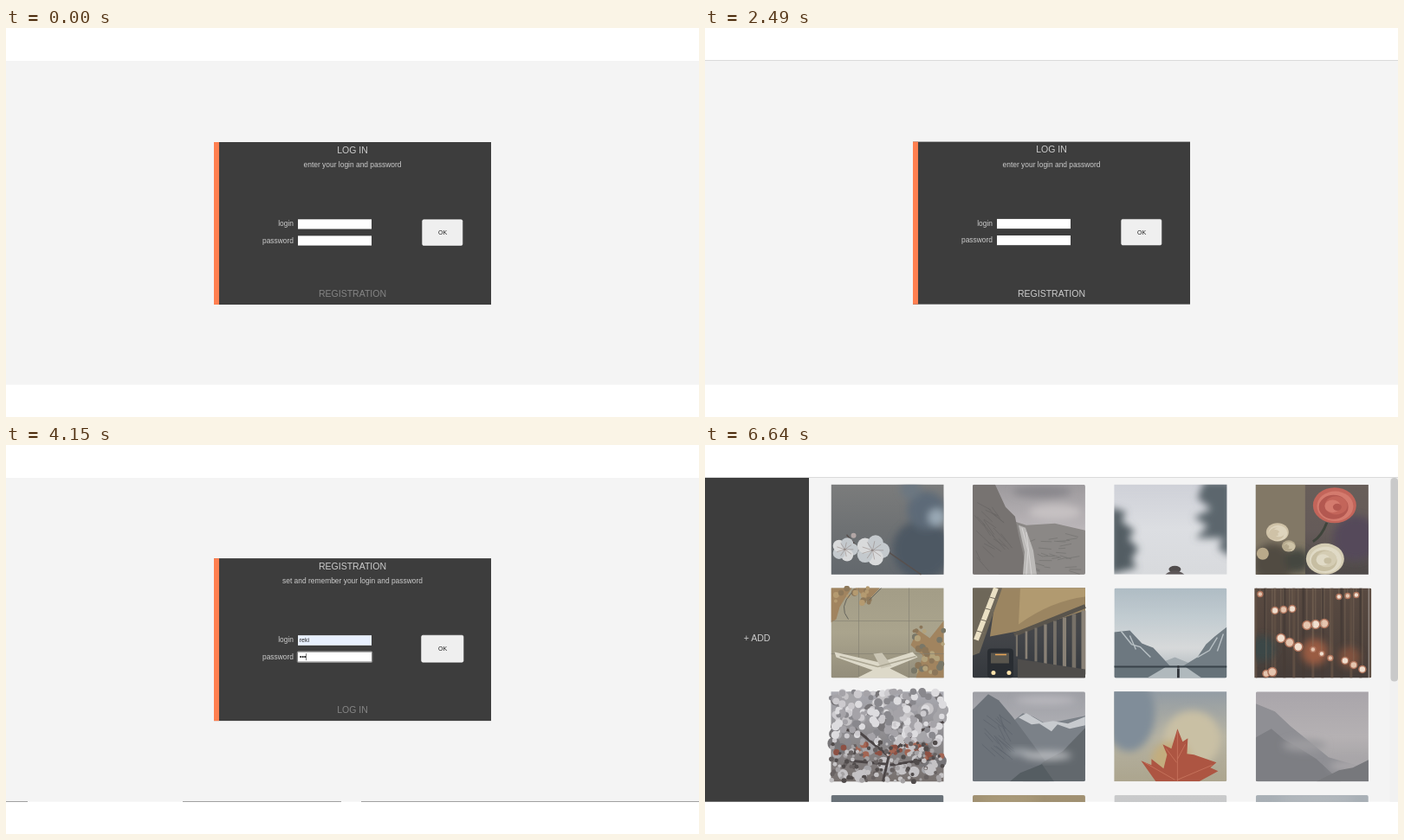
Animation, 800 px wide and 450 px high, one loop 8000 ms. Source, as an HTML page:

```html
<!DOCTYPE html>
<html lang="en">
<head>
<meta charset="utf-8">
<title>Login and gallery</title>
<style>
  html, body { margin: 0; width: 100%; height: 100%; overflow: hidden; background: #fff; }
  svg { display: block; }
  text { font-family: "Liberation Sans", Arial, sans-serif; font-size: 8.43px; fill: #ccc; }
  .big { font-size: 10.53px; }
  .mid { text-anchor: middle; }
  .end { text-anchor: end; }
  .field { font-size: 7.02px; fill: #222; }
  .alert { font-family: "Open Sans", "Noto Sans", sans-serif; font-size: 6.38px; fill: #3c4043; }
  .photo { clip-path: inset(0 round 2px); }
</style>
</head>
<body>
<svg id="stage" width="800" height="450" viewBox="0 0 800 450">
  <defs>
    <filter id="soft" x="-50%" y="-50%" width="200%" height="200%"><feGaussianBlur stdDeviation="4"/></filter>
    <filter id="shade" x="-10%" y="-10%" width="120%" height="130%"><feDropShadow dx="0" dy="1" stdDeviation="1.2" flood-opacity=".35"/></filter>
    <clipPath id="view"><rect y="37" width="800" height="376"/></clipPath>
  </defs>
  <rect y="38" width="800" height="374.7" fill="#f4f4f4"/>
  <rect data-on="line" y="37" width="800" height="1" fill="#dadada"/>
  <path data-on="edge" d="M0 412.5H25M204 412.5H387M410 412.5H800" stroke="#a0a0a0"/>

  <g id="panel" data-on="form">
    <rect x="240" y="132" width="320" height="188" fill="#3d3d3d"/>
    <rect x="240" y="132" width="6" height="188" fill="#ff7f50"/>
    <text id="head" class="big mid" x="400" y="144.5"></text>
    <text id="hint" class="mid" x="400" y="161"></text>
    <text class="end" x="332" y="229">login</text>
    <text class="end" x="332" y="248.5">password</text>
    <rect x="337" y="221.3" width="85" height="11.2" fill="#fff"/>
    <rect data-on="auto" x="337" y="221.3" width="85" height="11.2" fill="#e8f0fe"/>
    <rect data-on="focus" x="336.3" y="239.9" width="86.4" height="12.4" rx="1" fill="#111" stroke="#e8e8e8" stroke-width=".6"/>
    <rect x="337" y="240.4" width="85" height="11.2" fill="#fff"/>
    <g data-on="typed" class="field">
      <text class="field" x="338.7" y="229.2">reki</text>
      <circle cx="340.2" cy="246" r="1.1"/><circle cx="342.7" cy="246" r="1.1"/><circle cx="345.2" cy="246" r="1.1"/>
    </g>
    <rect data-on="focus" x="346.3" y="242" width=".6" height="8" fill="#222"/>
    <rect id="button" x="480.7" y="221.8" width="46.2" height="29.6" rx="1.5" fill="#efefef" stroke="#fff" stroke-width=".6"/>
    <text class="field mid" x="504" y="239">OK</text>
    <text id="link" class="big mid" x="400" y="311.4"></text>
  </g>

  <g data-on="alert" clip-path="url(#view)">
    <rect x="283" y="20" width="234" height="77.3" rx="2.5" fill="#fff" stroke="#b4b4b4" stroke-width=".7" filter="url(#shade)"/>
    <text class="alert" x="292" y="37.3" style="font-size:7px">my-photo-gallery.example.org says</text>
    <text class="alert" x="291.6" y="51.2">Authorisation Error. Check your login and password. If this is your first</text>
    <text class="alert" x="291.6" y="61.2">time, click "REGISTRATION"</text>
    <rect x="474.7" y="72" width="34.3" height="17.4" rx="1.8" fill="#1a73e8"/>
    <text class="alert mid" x="491.5" y="83" style="fill:#fff;font-weight:600;font-size:6px">OK</text>
  </g>

  <g data-on="gallery" clip-path="url(#view)">
    <rect y="38" width="120" height="374.7" fill="#3d3d3d"/>
    <text class="big mid" x="60" y="226.6">+ ADD</text>
    <g id="photos"></g>
    <rect x="790.5" y="38" width="9.5" height="374.7" fill="#f1f1f1"/>
    <rect x="791.5" y="38" width="8.5" height="235.5" rx="4" fill="#c9c9c9"/>
  </g>
</svg>
<script>
const $ = id => document.getElementById(id);

// Seeded random, so the photos look the same on every load
let seed = 7;
const rnd = (a, b) => a + (b - a) * ((seed = seed * 16807 % 2147483647) / 2147483647);

const bg = (...colors) => {
  const id = "bg" + Math.round(rnd(0, 1e9));
  const stops = colors.map((c, i) => `<stop offset="${i / (colors.length - 1)}" stop-color="${c}"/>`).join("");
  return `<linearGradient id="${id}" x2="0" y2="1">${stops}</linearGradient><rect width="130" height="104" fill="url(#${id})"/>`;
};
const dot = (x, y, r, fill, ry = r) => `<ellipse cx="${x}" cy="${y}" rx="${r}" ry="${ry}" fill="${fill}"/>`;
const shape = (d, fill) => `<path d="${d}" fill="${fill}"/>`;
const line = (d, color, w = 1) => `<path d="${d}" fill="none" stroke="${color}" stroke-width="${w}"/>`;
const soft = s => `<g filter="url(#soft)">${s}</g>`;
const many = (n, f) => Array.from({ length: n }, (_, i) => f(i)).join("");
const spray = (n, x, y, w, h, r, fills) =>
  many(n, i => dot(rnd(x, x + w), rnd(y, y + h), rnd(r / 2, r), fills[i % fills.length]));
const flower = (x, y, r) =>
  many(5, i => dot(x + r * .6 * Math.cos(i * 1.257), y + r * .5 * Math.sin(i * 1.257), r * .5, i % 2 ? "#d9dadb" : "#c4c9cd"))
  + many(9, i => line(`M${x} ${y}l${r * .7 * Math.cos(i * .7)} ${r * .6 * Math.sin(i * .7)}`, "#8b7d78", .5));
const rose = (x, y, r, fills) =>
  many(6, i => dot(x + (i % 2 ? 1 : -1) * i * .6, y + (i % 3 - 1), r * (1 - i * .16), fills[i % fills.length], r * .82 * (1 - i * .16)));

const photos = [
  // Cherry blossom
  bg("#7b7c7c", "#6e7173", "#63686d")
  + soft(dot(105, 75, 34, "#4d5964") + dot(110, 30, 22, "#5d6b78") + dot(122, 38, 10, "#9aa9b5") + dot(92, 5, 12, "#6c7781"))
  + line("M18 58L30 72L48 62L62 75L104 104", "#57504e", 1.5)
  + flower(16, 75, 14) + flower(48, 76, 18) + dot(26, 59, 3, "#b2a6a5"),
  // Cliff with a waterfall
  bg("#9d9a9d", "#bbb6b9", "#a5a2a2") + soft(dot(80, 8, 34, "#89878c", 7) + dot(95, 32, 30, "#c6c1c2", 9))
  + shape("M40 40L62 47L95 45L130 53V104H30Z", "#8b8886")
  + shape("M0 0H26L38 26L49 37L53 58L64 104H0Z", "#777371")
  + many(24, () => line(`M${rnd(0, 35)} ${rnd(15, 90)}l${rnd(4, 16)} ${rnd(6, 18)}`, "#686563", .7))
  + many(28, () => line(`M${rnd(65, 112)} ${rnd(55, 100)}l${rnd(6, 16)} ${rnd(-3, 5)}`, "#777573", .8))
  + shape("M53 47L61 50L70 76L74 104H58L60 78Z", "#bcbab8") + line("M57 50L64 76L62 104M62 55L68 104", "#d7d5d4"),
  // Misty pines
  bg("#cfd1d8", "#dcdee2", "#d8dadd")
  + soft(shape("M-5 26L14 32L8 42L24 54L16 62L28 74L20 86L26 96L-5 104Z", "#535d64")
    + shape("M104 -4H136V84L120 74L126 62L94 62L108 48L92 38L112 28L96 16Z", "#5c666d"))
  + dot(70, 98, 7, "#514d4d", 4) + shape("M59 104Q70 95 81 104Z", "#5c5657"),
  // Roses
  bg("#685e59", "#655b59", "#4e4948")
  + `<rect width="57" height="104" fill="#827866"/>` + soft(dot(115, 62, 26, "#554a5a") + dot(20, 92, 24, "#514c43") + dot(48, 88, 14, "#454740"))
  + rose(25, 56, 13, ["#cfc2a7", "#ded4bd"]) + rose(38, 72, 8, ["#b5a98d", "#cec3a7"]) + dot(8, 80, 7, "#b9a98a")
  + rose(91, 25, 25, ["#c3655a", "#d47b6e", "#b35850"])
  + line("M82 44Q76 60 66 66", "#3f443b", 3)
  + rose(80, 87, 22, ["#d4ccb3", "#e0dac6", "#c7bea2"]),
  // Map and toy plane
  bg("#a39d87", "#aaa48d", "#938d7b")
  + shape("M0 0H24L16 12L10 22L6 36L0 40Z M28 0H56L48 9L42 14Z M98 104L106 78L92 66L100 48L114 58L130 38V104Z", "#a1845f")
  + spray(30, 92, 45, 38, 55, 4, ["#8b7659", "#b3a27b", "#797768"])
  + spray(16, 0, 0, 46, 24, 4, ["#b49a70", "#8d785a"])
  + line("M0 38H130M32 0V104M90 0V104M0 76H130", "#827f71", .6) + line("M20 36Q8 22 24 5M44 14L58 0", "#65645c")
  + shape("M4 74L56 86L94 74L100 80L68 93L90 104H30L48 95L6 80Z", "#ddd9c9")
  + shape("M49 76L59 75L70 90L58 93Z", "#cac5b4") + line("M10 79L54 91L98 79", "#aaa592", 1.5),
  // Underground station
  bg("#4e4b47", "#44464a", "#34383d")
  + shape("M28 0H130V26L62 48L20 56Z", "#9b8561") + shape("M55 0H130V10Q90 15 53 42Z", "#b19a70")
  + shape("M0 0H34L8 75L0 78Z", "#6e6759") + line("M27 0L4 60", "#eae0c4", 6)
  + many(4, i => line(`M${18 - i * 5} ${10 + i * 13}l11 3`, "#776f60", 1))
  + line("M130 21L48 54", "#59544c", 5)
  + many(8, i => line(`M${128 - i * 11} ${26 + i * 4}V${100 - i * 3}`, i % 2 ? "#777168" : "#898176", 5 - i * .4))
  + shape("M130 94L52 82V104H130Z", "#4f4d4b")
  + `<rect x="17" y="70" width="30" height="34" rx="4" fill="#292d32"/><rect x="21" y="75" width="21" height="12" fill="#59564e"/>`
  + dot(24, 98, 2.5, "#ffe3ac") + dot(42, 98, 2.5, "#ffe3ac") + line("M26 77H39", "#e5a356", 1.5),
  // Lake between mountains
  bg("#afbcc4", "#c2ccd1", "#d7d9da", "#a7b1b7")
  + shape("M40 92L70 80L92 89V94H40Z", "#a1aaaf")
  + shape("M0 51L18 49L32 64L45 69L58 83L65 91H0Z", "#6d7880") + shape("M130 45L116 56L106 65L96 80L78 91H130Z", "#727d84")
  + line("M8 50L20 65L30 68L42 80M18 55L25 71M119 57L110 72L96 80M126 53L119 73", "#b8c0c4", 1.4)
  + `<rect y="90" width="130" height="14" fill="#667279"/>` + shape("M38 104L60 91H82L101 104Z", "#b0b9bd")
  + line("M0 91H130", "#39434a", 2) + dot(74, 91, 1.5, "#30343a") + line("M74 93V104", "#30343a", 2.8),
  // Hanging bulbs
  bg("#594a41", "#51443d", "#463d39")
  + many(13, i => line(`M${i * 11} 0V104`, i % 2 ? "#473c37" : "#5e4e43", 3))
  + soft(dot(68, 74, 15, "#9a5c42") + dot(108, 80, 12, "#80513e") + dot(8, 70, 15, "#3a4647"))
  + many(21, i => {
    const x = 5 + i * 37 % 121, y = i < 10 ? 7 + i * 17 % 50 : 57 + i * 13 % 44, r = 2.2 + i % 3;
    return line(`M${x} 0V${y}`, "#8d7864", .5) + dot(x, y, r + 1.5, "#ae735b") + dot(x, y, r, i % 2 ? "#f1dfcf" : "#e5c5af");
  }),
  // Tree in bloom
  bg("#aaaab1", "#8d8b8e", "#77706e") + spray(65, 0, 0, 130, 104, 8, ["#a6a5a9", "#777578", "#c5c3c6"])
  + line("M60 104L67 73L96 48L130 35M67 75L34 48L0 40M65 84L22 80M68 85L115 78", "#4b4546", 3)
  + spray(28, 0, 61, 130, 16, 4, ["#8d5144", "#a36553"])
  + spray(170, 0, 0, 130, 60, 5, ["#cccace", "#a5a3a8", "#dddcdf", "#89888d"])
  + spray(150, 0, 58, 130, 46, 3, ["#c4c2c4", "#686262", "#a5a2a4", "#514c4c"]),
  // Snowy valley
  bg("#9e9fa5", "#b2b2b7", "#a5a8ad") + soft(dot(84, 10, 35, "#b9b8bd", 5))
  + shape("M42 38L58 25L70 29L84 37L101 34L130 28V85H42Z", "#7b8188")
  + shape("M53 30L62 25L81 36L93 34L110 37L130 29V39L112 43L98 38L91 46L77 37L68 38Z", "#c7cace")
  + shape("M0 21L18 3L30 10L46 29L63 52L88 86V104H0Z", "#6c7279")
  + shape("M130 42L104 69L82 81L58 104H130Z", "#62686d")
  + many(18, () => line(`M${rnd(8, 34)} ${rnd(20, 70)}l${rnd(5, 20)} ${rnd(9, 20)}`, "#5d646c", .8))
  + soft(dot(86, 74, 28, "#b8babd", 5) + dot(55, 70, 13, "#abb0b5", 3)) + shape("M55 94L80 84L94 104H43Z", "#555d62"),
  // Maple leaf
  bg("#939ca4", "#b5b2a2", "#aca58e")
  + soft(dot(17, 25, 30, "#808d99", 44) + dot(90, 55, 33, "#c9c0a4") + dot(66, 80, 23, "#c3ad7e"))
  + shape("M73 43L79 58L85 54L84 72L92 73L118 82L111 88L120 92L98 104H48L31 80L43 85L43 78L57 89L61 73L56 61L66 66Z", "#ad5542")
  + line("M73 46V104M73 102L113 85M70 102L35 82M73 78L82 61M72 82L60 66", "#ca7860", .8),
  // Misty slopes
  bg("#a9a5aa", "#b5b1b3", "#9b9a9d")
  + shape("M0 14L22 23L40 40L61 57L84 76L130 89V104H0Z", "#8f8f94")
  + shape("M0 53L18 43L32 55L48 64L70 78L98 104H0Z", "#7d7e83")
  + soft(dot(56, 62, 25, "#9c9b9f", 7) + dot(110, 86, 25, "#aaa7aa", 6))
  + shape("M70 104L96 91L112 88L130 79V104Z", "#77787c"),
  bg("#697178", "#626a71"),
  bg("#a19172", "#92886f") + soft(dot(42, 5, 34, "#b0a17f", 3)),
  bg("#c9cacb", "#bdbfc1"),
  bg("#a9b0b6", "#9fa7ae") + soft(dot(70, 4, 45, "#bbc0c4", 3))
];
$("photos").innerHTML = photos.map((p, i) =>
  `<g transform="translate(${145.5 + i % 4 * 163.45} ${45.8 + (i >> 2) * 119.75})"><svg class="photo" width="130" height="104">${p}</svg></g>`
).join("");

// One scene every 830 ms; the last one stays until the loop ends
const scenes = [
  "form",
  "form typed focus line",
  "form typed hover alert line",
  "form pick line",
  "form register",
  "form register typed focus auto hover edge",
  "form",
  "form typed focus line",
  "gallery line"
].map(s => s.split(" "));

const parts = document.querySelectorAll("[data-on]");
let shown;

function show(scene) {
  const has = s => scene.includes(s), reg = has("register");
  for (const p of parts) p.style.display = has(p.dataset.on) ? "" : "none";
  $("head").textContent = reg ? "REGISTRATION" : "LOG IN";
  $("hint").textContent = reg ? "set and remember your login and password" : "enter your login and password";
  $("link").textContent = reg ? "LOG IN" : "REGISTRATION";
  $("link").style.fill = has("pick") ? "#ccc" : "#858585";
  $("panel").setAttribute("transform", `translate(0 ${reg ? -.9 : has("pick") ? -.4 : 0})`);
  $("button").setAttribute("transform", has("hover") ? "translate(503.8 236.6) scale(1.045) translate(-503.8 -236.6)" : "");
}

function frame() {
  const i = Math.min(scenes.length - 1, Math.floor(performance.now() % 8000 / 830));
  if (i !== shown) show(scenes[shown = i]);
  requestAnimationFrame(frame);
}
frame();
</script>
</body>
</html>
```
